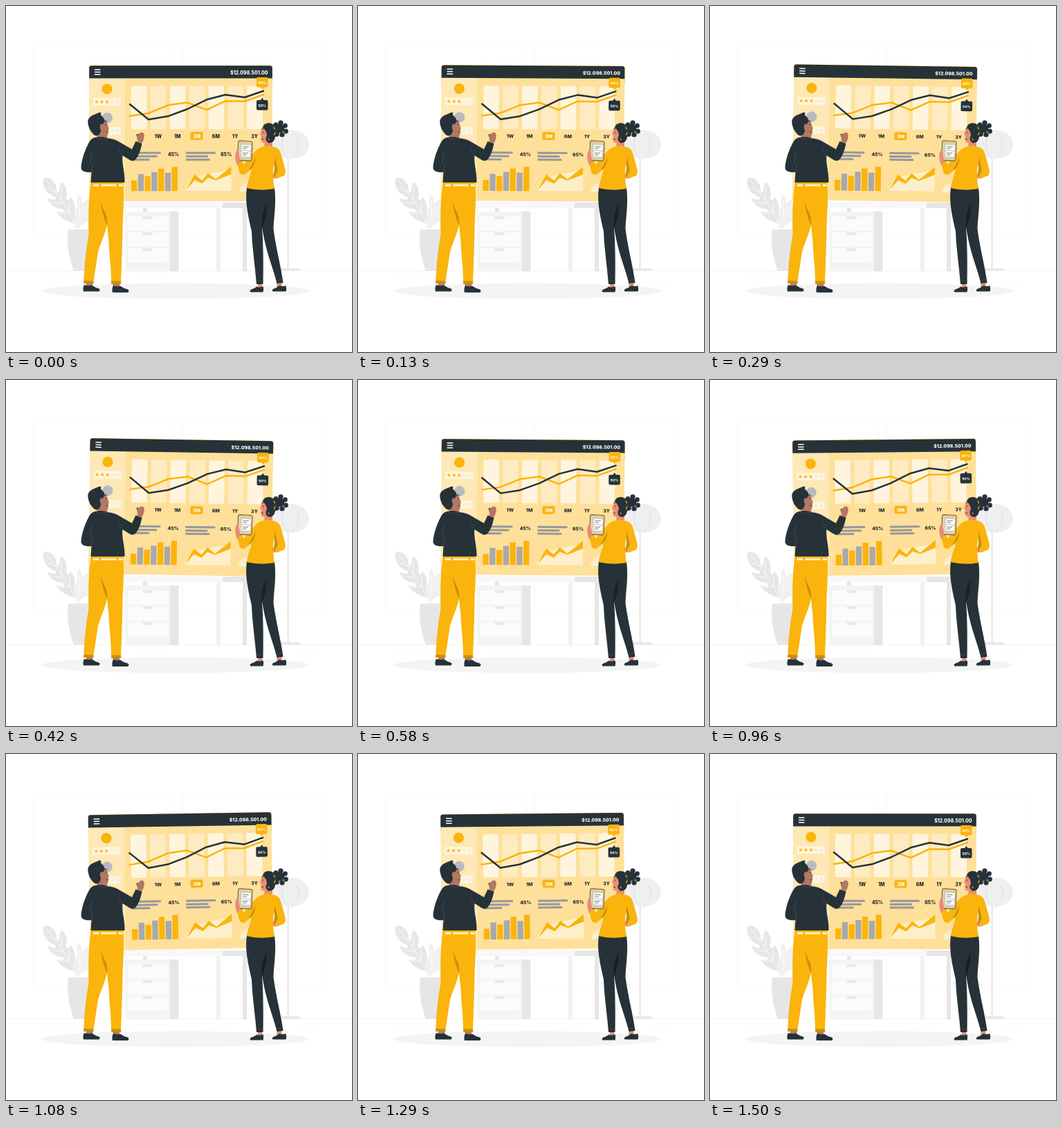
Recreate the animation shown at these times as an HTML page. Size 500x500 px, loop 1.54 s.

```html
<!DOCTYPE html>
<html lang="en">
<head>
<meta charset="utf-8">
<title>Dashboard</title>
<style>
  html, body { margin: 0; width: 100%; height: 100%; overflow: hidden; background: #fff; }
  svg { display: block; width: 100vw; height: 100vh; }
  text { font: 800 6.9px Inter, sans-serif; text-anchor: middle; fill: #1d262b; }
  .white { fill: #fff; }
  .tip { font-size: 4.9px; }
  .dark { fill: #263238; }
  .gold { fill: #fbb40c; }
  .shade { fill: #c98f10; }
  .brown { fill: #b27863; }
  .pink { fill: #e78d77; }
  .line { fill: none; stroke-linecap: round; stroke-linejoin: round; }
</style>
</head>
<body>
<svg viewBox="0 0 500 500">
  <!-- room -->
  <g fill="none" stroke="#f7f7f7" stroke-width=".8">
    <rect x="39.5" y="55.5" width="203" height="282" rx="1"/>
    <rect x="255.5" y="55.5" width="203" height="282" rx="1"/>
    <path stroke="#f0f0f0" d="M0 382.5H500"/>
    <path d="M53 391.5H112M195 391.5H235M416 398.5H448"/>
  </g>
  <ellipse cx="245" cy="412" rx="193" ry="11.5" fill="#f4f4f4"/>

  <!-- lamp -->
  <g fill="#e8e8e8">
    <rect x="406.5" y="215" width="2.4" height="166"/>
    <path d="M391 383q0-4 4-4h27q4 0 4 4z"/>
    <path fill="#efefef" d="M385 200C385 188 398 179.5 414 179.5C429 180 438 190 438 200S429 220 414 220.5C398 220.5 385 212 385 200z"/>
    <path class="line" stroke="#e2e2e2" d="M413 180Q434 200 413 220M407 180Q390 200 407 220"/>
  </g>

  <!-- plant -->
  <g fill="#e6e6e6">
    <path d="M101 315C90 312 78 307 73 297C82 299 87 297 83 294C70 292 62 286 60 277C68 282 75 280 71 276C60 272 52 262 54 250C58 246 67 249 71 257C74 261 72 268 75 270C79 264 77 257 80 255C87 258 89 268 87 276C87 282 91 283 93 276C99 282 101 292 99 300z"/>
    <path fill="#f0f0f0" d="M101 322C96 311 98 297 104 290C101 282 103 276 106 272C110 278 109 284 110 286C114 281 119 278 124 277V312C114 311 108 315 105 323z"/>
    <path class="line" stroke="#fff" stroke-width=".8" d="M59 253Q85 281 101 318M71 269L60 264M82 286L66 283M90 299L78 299M80 281V262M92 299V284M103 322Q105 300 121 284M106 304V282"/>
    <path d="M90 323H126V383H98Q86 349 90 323z"/>
  </g>

  <!-- desk -->
  <path fill="#e6e6e6" d="M313 284H350V292H313zM342 292H348V383.5H342zM198 291H204V298H198zM237 297H249.5V383.5H237z"/>
  <path fill="#f1f1f1" d="M304 292H310V383.5H304z"/>
  <path fill="#f8f8f8" d="M166 283H313V292H166z"/>
  <path fill="#f4f4f4" d="M172 297H237V383.5H172z"/>
  <path fill="#fbfbfb" d="M176.5 304h57v21h-57zm0 23h57v21h-57zm0 23h57v21h-57z"/>
  <path fill="#e9e9e9" d="M197.5 304h14.5v4h-14.5zm0 23h14.5v4h-14.5zm0 23h14.5v4h-14.5z"/>

  <g id="panel">
    <rect class="gold" x="120" y="86" width="265" height="30" rx="3.5"/>
    <path fill="#fee09a" d="M120.2 102H384.8V278.5Q384.8 282 381 282H124Q120.2 282 120.2 278.5z"/>
    <path fill="#fee8b5" d="M120.2 103H172V282H124Q120.2 282 120.2 278.5z"/>
    <path class="dark" d="M120.2 104.5V89.8Q120.2 86.3 123.7 86.3H381.3Q384.8 86.3 384.8 89.8V104.5z"/>
    <path stroke="#fff" stroke-width="1.5" d="M128 92H136.5M128 95.5H136.5M128 99H136.5"/>
    <text class="white" x="351.3" y="98.7">$12.098.501.00</text>

    <circle class="gold" cx="146" cy="120" r="7.6"/>
    <circle fill="#b8babd" cx="146.5" cy="161.5" r="7.6"/>
    <g id="side"></g>
    <g id="stripes"></g>

    <g class="line" stroke-width="2.5">
      <path stroke="#fbb40c" d="M179 159L206 155L234 143.3L262 139.5L290 150L317 137.3L345 137.7L372 128"/>
      <path stroke="#263238" d="M179 142L206 164L234 159.3L262 149L290 135.3L317 128.2L345 132L372 122.7"/>
    </g>
    <path class="gold" d="M364 103H376.5Q378.5 103 378.5 105V115.5Q378.5 117.5 376.5 117.5H372.5L370.3 120.5L368 117.5H364Q362 117.5 362 115.5V105Q362 103 364 103z"/>
    <path class="dark" d="M364 136H368L370.3 132.8L372.5 136H376.5Q378.5 136 378.5 138V148.5Q378.5 150.5 376.5 150.5H364Q362 150.5 362 148.5V138Q362 136 364 136z"/>
    <text class="tip white" x="370.3" y="112.5">60%</text>
    <text class="tip white" x="370.3" y="145.7">50%</text>

    <rect class="gold" x="266.5" y="182" width="18" height="11.5" rx="2.5"/>
    <g id="ranges"></g>

    <path class="line" stroke="#96989c" stroke-width="3" d="M182 212.3H222.5M182 217.3H217.5M182 222H206.5M261 212.3H301.5M261 217.3H290.5M261 222H293.5"/>
    <text x="242" y="216.9">45%</text>
    <text x="318.3" y="216.9">65%</text>

    <g id="bars"></g>
    <path fill="#feefcb" d="M260 267V262L273 247L325.5 236V267z"/>
    <path class="gold" d="M260 266L272.5 243.5L283.5 252L292 241.5L303 250.3L325.5 232V243L303 252L292 248L283.5 256.5L273 251.5z"/>
    <path fill="#feefcb" d="M337 268A13.5 13.5 0 0 1 364 268z"/>
  </g>

  <!-- man -->
  <g class="dark">
    <path class="brown" d="M116 398H125.5L125 405H116zM154 398H164V406H155z"/>
    <path d="M113 403Q118 405 124 403.5Q129 407 134.5 408.5Q136.5 410 134.5 412.5H112Q110.5 408 113 403zM155 404Q160 406 165 404.5Q170 408 176 409.5Q178.5 411 176.5 414H154Q152.5 409 155 404z"/>
    <path class="gold" d="M123 254H169.5C171 285 169 300 168.5 324C168 350 167 375 166 399H152C152 375 149 360 148.5 340L146 316C141 338 134 346 132 362L126.5 398H112.5C113 374 116 350 119.5 331C119 305 119 278 123 254z"/>
    <path class="shade" d="M136.5 282Q139 301 146 317Q147 306 144 300Q139 292 136.5 282zM112.5 396.5L126.7 397.5V401H112zM152 397.5H166.2V402H152.3z"/>
    <path fill="#fff0c8" d="M126 257.5h8v3h-8zM137 257.5h22.5v3H137zM162.5 257.5h6.5v3h-6.5z"/>
    <path class="brown" d="M133 178L147 182L146 193H131zM190 196C189 188 192 183 196 182.5C200 183 200.5 187 199.5 190C199 194 197 197 196 199z"/>
    <path class="brown" d="M137 163C142 163 146 167 147 172L149 177.5L147.5 179C149 186 146 188 142 187.5L134 187z"/>
    <path d="M118.3 168C118 161 124 158 131 155.5Q136 152.5 137.5 154.5Q136 157 139 159.5Q143 163 142.5 168Q140 169 140 172Q135 170 136 177Q138 180 136 183C135 188 129 189 126 185C121 180 119 174 118.3 168z"/>
    <circle class="brown" cx="139" cy="173.5" r="3"/>
    <path class="line" stroke="#263238" stroke-width=".9" d="M143 165.5L146 167M144.5 170.5V171.5M145 182L147 181"/>
    <path d="M129 190Q138 187.5 147 191Q157 192 163 196L182 207L187.5 195.5L196.5 199Q193 216 187 222Q183 225.5 178 222L168.5 216C167 228 172 240 171.5 255H122.5L123.5 240C115 241 109 239 108.5 234C109 222 114 208 120 197Q123 191 129 190z"/>
    <path class="line" stroke="#47545a" stroke-width=".7" d="M131 190.5Q139 194 147 191.5M124.5 210Q123 219 121.5 227L125 229M124 240L125 229M163 207Q164 213 168.5 216"/>
  </g>

  <!-- woman -->
  <g class="dark">
    <path class="pink" d="M364 399H370V407H364zM391 398L398 397L399 406H391.5z"/>
    <path d="M371.5 405Q366 407.5 362.5 405.5Q358 409 353.5 410Q352 411.5 353 413.5H371.5Q373 409 371.5 405zM404 404Q399 406 395 404Q390 408 386 409Q384 410.5 385.5 412.5H404.5Q406 408 404 404z"/>
    <path d="M348 262H388C391 286 387 304 386.5 322C390 350 397 374 400.5 400L391.5 401C386 378 374 352 370 318C372 350 372 376 371.5 402H362C360 376 356 352 355 326C350 304 345 284 348 262z"/>
    <path fill="#172025" d="M377 287Q368 299 370 322Q377 303 377 287z"/>
    <path class="line" stroke="#455258" stroke-width=".6" d="M362 397.5H371.5M391 396.5L400 395.5"/>
    <path class="pink" d="M374 193H385V207Q379 210 373 205zM332 212Q335 207 337 212L342 226L339 234L333.5 229Q330 220 332 212zM392 243L385 245Q384 248 386 249L394 249z"/>
    <path class="gold" d="M372 203Q381 201 389 204Q395 206 397.5 214L403.5 236Q405 244 400 246L390 249.5L389.5 244.5L393 239L387.5 228C385 240 386 252 388 264Q367 268 347.5 263C350 252 354 242 355 234L346 243Q341 246 337.5 241L334 226L340 224L344 229C352 220 360 206 372 203z"/>
    <path class="shade" d="M355 235Q360 228 360.5 219Q356 228 350 239zM387.5 228Q389 223 388.5 217L393 239L389.5 244.5L385.5 246Q389 237 387.5 228z"/>
    <path class="pink" d="M374 173Q369 174 369 180L367 185.5L369 187.5Q367 196 371 197.5L379 198L384 184z"/>
    <path d="M371 175Q373 169 380 169Q387 170 390 176Q391 190 386 196Q380 200 377 196Q374 192 377 187Q377 181 371 175z"/>
    <g id="curls"></g>
    <path class="line" stroke="#263238" stroke-width=".9" d="M370 177.5L373 177M371.5 182V183M369.5 192L371.5 192.5"/>
    <path class="line" stroke="#fbb40c" stroke-width="1.3" d="M387 175L388.5 178M389 183L387.5 186M379.5 192V193.5"/>
    <g transform="rotate(3 345 209)">
      <rect x="335" y="195" width="20.5" height="28.5" rx="2.5" fill="#d9ceb4" stroke="#776030" stroke-width="1.1"/>
      <path stroke="#f2b83c" stroke-width=".8" d="M336.5 196H354"/>
      <path fill="#fff" d="M340.5 201h12.5v7.5h-12.5zM340.5 210h12.5v7.5h-12.5z"/>
      <path stroke="#777d80" d="M342 203.5h8.5M342 206h6M342 212.5h8.5M342 215h6"/>
    </g>
    <path class="pink" d="M332 211Q334 207 336 210L338 221L336 230L333 224z"/>
  </g>
</svg>
<script>
  const SWING = 1500, LOOP = 1540;
  const byId = id => document.getElementById(id);
  const fill = (id, items, draw) => byId(id).innerHTML = items.map(draw).join('');
  const rect = (x, y, w, h, color, rx = 0) =>
    `<rect x="${x}" y="${y}" width="${w}" height="${h}" rx="${rx}" fill="${color}"/>`;

  function star(cx, cy, color) {
    const points = Array.from({ length: 10 }, (_, i) => {
      const r = i % 2 ? 1.35 : 3, a = i * Math.PI / 5;
      return `${cx + r * Math.sin(a)},${cy - r * Math.cos(a)}`;
    });
    return `<polygon points="${points.join(' ')}" fill="${color}"/>`;
  }

  fill('side', [138.6, 180.5], y => rect(126, y - 5.5, 40, 11, '#fff5dc', 1) +
    [0, 1, 2, 3, 4].map(i => star(131 + i * 7.5, y, i < 3 ? '#fbb40c' : '#ebebeb')).join(''));
  fill('stripes', [0, 1, 2, 3, 4, 5, 6], i =>
    rect(181 + i * 27.9, 115.5, 22.5, 62.5, i % 2 ? '#feebc2' : '#fff5de', 1));
  fill('ranges', ['1D', '1W', '1M', '3M', '6M', '1Y', '3Y'], (label, i) =>
    `<text x="${192 + i * 27.85}" y="190.6"${label === '3M' ? ' class="white"' : ''}>${label}</text>`);
  fill('bars', [15.5, 24.5, 21.5, 27.5, 32.5, 26.5, 35], (h, i) =>
    rect(181 + i * 9.75, 267.5 - h, 8.4, h, i % 2 ? '#a8a9ab' : '#fbb40c'));
  fill('curls', [[396, 177, 6.5], [390, 172, 3.7], [397, 168.8, 3.6], [403.5, 173, 3.4],
    [404.5, 181, 3.4], [399, 186, 3.6], [391, 185, 3.8], [387, 179, 4.5]],
    ([x, y, r]) => `<circle cx="${x}" cy="${y}" r="${r}"/>`);

  // Triangle wave: 0, +1, 0, -1, 0 degrees, then a short rest.
  function angleAt(time) {
    const p = Math.min(time % LOOP, SWING) / SWING * 4;
    return p < 1 ? p : p < 3 ? 2 - p : p - 4;
  }

  const panel = byId('panel'), start = performance.now();
  function frame() {
    panel.setAttribute('transform', `rotate(${angleAt(performance.now() - start)} 252.5 184)`);
    requestAnimationFrame(frame);
  }
  frame();
</script>
</body>
</html>
```
